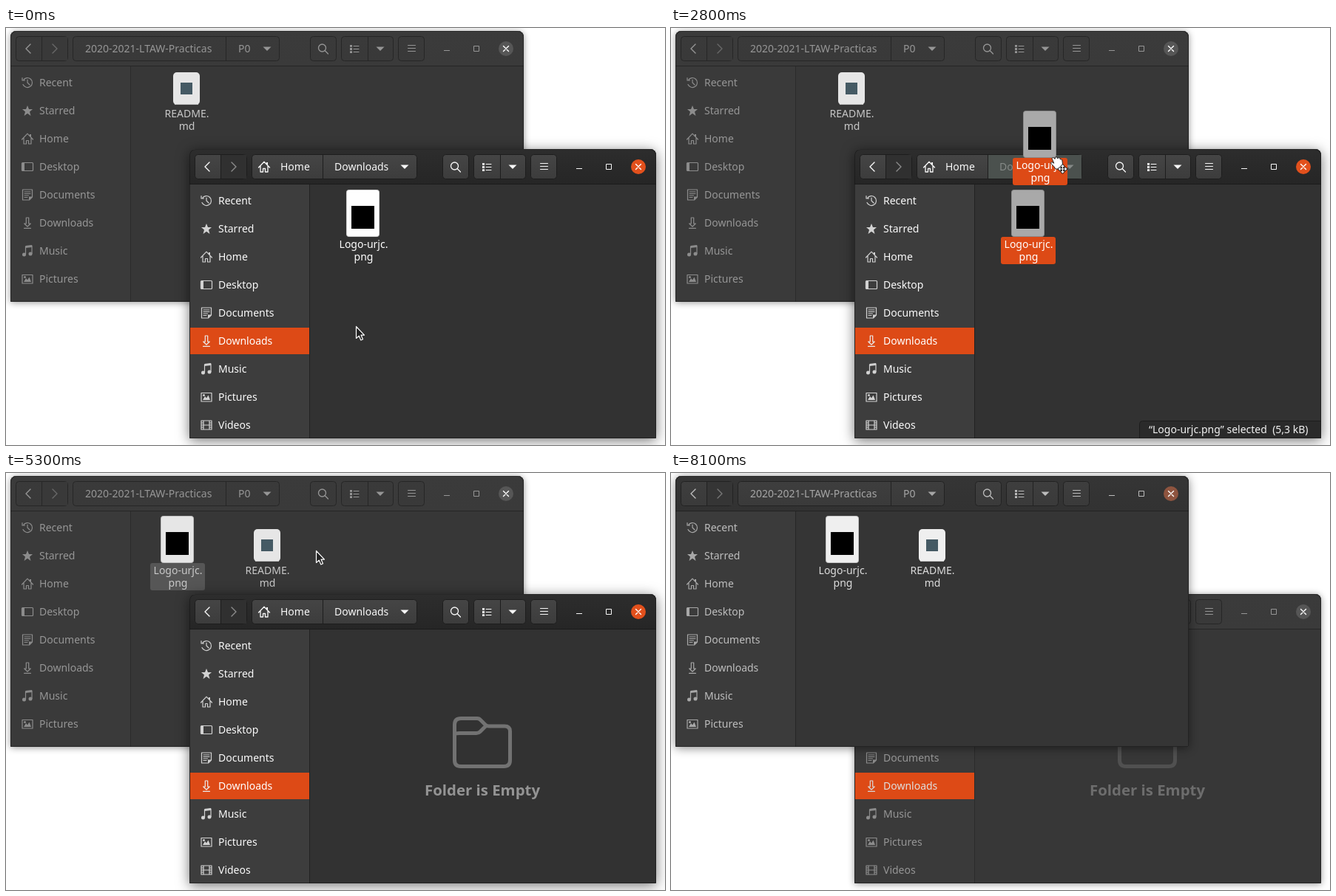
Animation, 891 px wide and 565 px high, one loop 8.2 s. Source, as an HTML page with a canvas:

```html
<!DOCTYPE html>
<html lang="en">
<head>
<meta charset="utf-8">
<title>Moving a file between folders</title>
<style>
  html, body { margin: 0; width: 100%; height: 100%; overflow: hidden; background: #fff; }
  canvas { display: block; width: 891px; height: 565px; }
</style>
</head>
<body>
<canvas id="stage" width="891" height="565"></canvas>
<script>
const ctx = document.getElementById('stage').getContext('2d');
const LOOP = 8200, STEP = 100;
const FONT = '14px "Noto Sans", "Open Sans", sans-serif';
const ORANGE = [221, 74, 22];

const lerp = (a, b, p) => a + (b - a) * p;
const rgb = c => `rgb(${c.map(Math.round).join(',')})`;
const grey = v => rgb([v, v, v]);
const mix = (a, b, p) => rgb(a.map((v, i) => lerp(v, b[i], p)));

// Piecewise linear track of [time, ...values]
function track(t, keys) {
  if (t <= keys[0][0]) return keys[0].slice(1);
  for (let i = 1; i < keys.length; i++) {
    const a = keys[i - 1], b = keys[i];
    if (t <= b[0]) {
      const p = (t - a[0]) / (b[0] - a[0]);
      return a.slice(1).map((v, k) => lerp(v, b[k + 1], p));
    }
  }
  return keys[keys.length - 1].slice(1);
}

function box(x, y, w, h, r, fill, stroke, lineWidth = 1) {
  ctx.beginPath();
  ctx.roundRect(x, y, w, h, r);
  if (fill) { ctx.fillStyle = fill; ctx.fill(); }
  if (stroke) { ctx.strokeStyle = stroke; ctx.lineWidth = lineWidth; ctx.stroke(); }
}

function rect(x, y, w, h, fill) {
  ctx.fillStyle = fill;
  ctx.fillRect(x, y, w, h);
}

function text(str, x, y, fill, align = 'left', font = FONT) {
  ctx.font = font;
  ctx.textAlign = align;
  ctx.fillStyle = fill;
  ctx.fillText(str, x, y);
}

function shape(x, y, stroke, line, fill, solid, width = 1.2) {
  ctx.save();
  ctx.translate(x, y);
  ctx.lineWidth = width;
  ctx.lineJoin = ctx.lineCap = 'round';
  if (solid) { ctx.fillStyle = fill; ctx.fill(new Path2D(solid)); }
  if (line) { ctx.strokeStyle = stroke; ctx.stroke(new Path2D(line)); }
  ctx.restore();
}

// [outline, solid part], centred on 0,0
const ICONS = {
  Recent: ['M-5.6-3.3A6.5 6.5 0 1 1-6 2.5M-7-6.5V-3H-3.5M0-4V0L3 3', ''],
  Starred: ['', 'M0-7L2-2H7L3 1.5 4.5 7 0 3.7-4.5 7-3 1.5-7-2H-2Z'],
  Home: ['M-7.5 1L0-6.8 7.5 1M-5-1V7H-1.5V2.5H1.5V7H5V-1', 'M3-6H5V-2L3-4Z'],
  Desktop: ['M-6.5-5.5H6.5Q7.5-5.5 7.5-4.5V4.5Q7.5 5.5 6.5 5.5H-6.5Q-7.5 5.5-7.5 4.5V-4.5Q-7.5-5.5-6.5-5.5Z', 'M-7-5H-4V5H-7Z'],
  Documents: ['M-6.5-7H6.5V3L2.5 7H-6.5ZM-4-4H4M-4-1.5H4M-4 1H1.5M-4 3.5H0', 'M6.5 2.5H2V7Z'],
  Downloads: ['M-1.7-7H1.7V1H4.3L0 5-4.3 1H-1.7ZM-4.5 7.3H4.5', ''],
  Music: ['M-2.5 4.5V-6L6-7V3.5', 'M-2.5-7L6-8V-5L-2.5-4ZM-2 5A2.5 2.5 0 1 1-7 5 2.5 2.5 0 1 1-2 5M6.5 4A2.5 2.5 0 1 1 1.5 4 2.5 2.5 0 1 1 6.5 4'],
  Pictures: ['M-7-5.5H7V6H-7Z', 'M-5 4L-2-1 0 1.5 2.5-2.5 5 4ZM-5-2.5A1.5 1.5 0 1 1-2-2.5 1.5 1.5 0 1 1-5-2.5'],
  Videos: ['M-7-6H7V6H-7ZM-4-6V6M4-6V6M-4 0H4M-7-3H-4M-7 0H-4M-7 3H-4M4-3H7M4 0H7M4 3H7', '']
};
const PLACES = Object.keys(ICONS);

const HEAD = {
  back: ['M3-6L-3 0 3 6', ''],
  next: ['M-3-6L3 0-3 6', ''],
  search: ['M4-1A5 5 0 1 1-6-1 5 5 0 1 1 4-1M2.8 2.8L7 7', ''],
  list: ['M-1-4H6M-1 0H6M-1 4H6', 'M-6-5.5H-3V-2.7H-6ZM-6-1.4H-3V1.4H-6ZM-6 2.7H-3V5.5H-6Z'],
  menu: ['M-5-4H5M-5 0H5M-5 4H5', ''],
  drop: ['', 'M-5.5-2.5H5.5L0 3Z']
};

function icon(def, x, y, color, width) {
  shape(x, y, color, def[0], color, def[1], width);
}

function buttons(y, focus, edges) {
  const x = edges[0], w = edges[edges.length - 1] - x;
  const fill = ctx.createLinearGradient(0, y, 0, y + 34);
  fill.addColorStop(0, grey(lerp(58, 69, focus)));
  fill.addColorStop(1, grey(lerp(57, 60, focus)));
  box(x + .5, y + .5, w - 1, 33, 4, fill, grey(lerp(38, 29, focus)));
  for (const e of edges.slice(1, -1)) rect(e, y + 1, 1, 32, grey(lerp(38, 29, focus)));
}

function logoCard(x, y, white, ink = 0) {
  box(x + .5, y + .5, 44, 63, 3, grey(white), grey(white * .82));
  rect(x + 7, y + 22, 31, 31, grey(ink));
}

function noteCard(x, y, white) {
  box(x, y, 36, 44, 5, grey(white));
  rect(x + 2, y + 43, 32, 1, grey(white * .82));
  rect(x + 10, y + 14, 16, 16, '#455a64');
}

function label(lines, cx, y, color) {
  lines.forEach((s, i) => text(s, cx, y + i * 17, color, 'center'));
}

function logoFile(x, y, white, color, plate, ink) {
  if (plate) box(x - 14, y + 64, 74, 37, 3, plate);
  logoCard(x, y, white, ink);
  label(['Logo-urjc.', 'png'], x + 23.5, y + 79, color);
}

function noteFile(x, y, white, color) {
  noteCard(x, y, white);
  label(['README.', 'md'], x + 18.5, y + 61, color);
}

function header(x, y, w, focus, path) {
  const cy = y + 24, right = x + w, top = y + 7;
  const bg = ctx.createLinearGradient(0, y, 0, y + 47);
  bg.addColorStop(0, grey(lerp(59, 45, focus)));
  bg.addColorStop(1, grey(lerp(58, 38, focus)));
  rect(x, y, w, 47, bg);
  rect(x, y, w, 1, grey(lerp(66, 62, focus)));
  rect(x, y + 47, w, 1, grey(lerp(38, 27, focus)));

  const ink = grey(lerp(150, 248, focus));
  const pathInk = grey(lerp(150, 248, focus * focus));
  buttons(top, focus, [x + 7, x + 42, x + 78]);
  rect(x + 43, top + 1, 34, 32, grey(lerp(57, 48, focus)));
  icon(HEAD.back, x + 24, cy, ink, 1.4);
  icon(HEAD.next, x + 60, cy, grey(lerp(105, 140, focus)), 1.4);

  const [split, end] = path.edges;
  buttons(top, focus, [x + 84, x + split, x + end]);
  if (path.target) rect(x + split + 1, top + 1, end - split - 2, 32, '#4b514e');
  const lastInk = path.target ? '#858a87' : pathInk;
  if (path.home) icon(ICONS.Home, x + 101, cy, pathInk, 1.3);
  text(path.names[0], x + path.at[0], cy + 5, pathInk);
  text(path.names[1], x + path.at[1], cy + 5, lastInk);
  icon(HEAD.drop, x + end - 17, cy, lastInk);

  buttons(top, focus, [right - 289, right - 253]);
  buttons(top, focus, [right - 247, right - 211, right - 176]);
  buttons(top, focus, [right - 170, right - 134]);
  icon(HEAD.search, right - 271.5, cy, ink, 1.3);
  icon(HEAD.list, right - 229, cy + .5, ink, 1);
  icon(HEAD.drop, right - 194, cy, ink);
  icon(HEAD.menu, right - 151.5, cy - .5, ink, 1);

  rect(right - 108, cy + 2, 8, 1, ink);
  box(right - 67.5, cy - 3.5, 7, 7, 0, null, ink);
  ctx.beginPath();
  ctx.arc(right - 24, cy, 10, 0, 7);
  ctx.fillStyle = mix([86, 86, 86], [226, 80, 28], focus);
  ctx.fill();
  shape(right - 24, cy, '#fff', 'M-3.5-3.5L3.5 3.5M3.5-3.5L-3.5 3.5', '', '', 1.4);
}

function sidebar(x, y, h, focus, active) {
  rect(x, y + 48, 162, h - 48, grey(lerp(58, 61, focus)));
  rect(x + 162, y + 48, 1, h - 48, grey(lerp(43, 34, focus)));
  PLACES.forEach((name, i) => {
    const cy = y + 70 + i * 38, on = name === active;
    if (on) rect(x + 1, cy - 18, 161, 36, rgb(ORANGE));
    icon(ICONS[name], x + 23, cy, grey(on ? lerp(215, 235, focus) : lerp(140, 210, focus)));
    text(name, x + 39, cy + 5, grey(on ? lerp(222, 255, focus) : lerp(150, 250, focus)));
  });
}

function folderWindow(x, y, w, h, focus, path, active, content) {
  const corners = [8, 8, 1, 1];
  ctx.save();
  ctx.shadowColor = `rgba(0,0,0,${lerp(.42, .55, focus)})`;
  ctx.shadowBlur = lerp(10, 17, focus);
  ctx.shadowOffsetY = lerp(1, 3, focus);
  box(x, y, w, h, corners, '#333');
  ctx.restore();

  ctx.save();
  ctx.beginPath();
  ctx.roundRect(x, y, w, h, corners);
  ctx.clip();
  rect(x, y, w, h, grey(lerp(55, 50, focus)));
  sidebar(x, y, h, focus, active);
  header(x, y, w, focus, path);
  content();
  box(x + .5, y + .5, w - 1, h - 1, corners, null, 'rgba(20,20,20,.55)');
  ctx.restore();
}

function emptyFolder(focus, alpha) {
  ctx.save();
  ctx.globalAlpha = alpha;
  const line = 'M2.5 24V11Q2.5 2.5 11 2.5H33Q36 2.5 38 5L44 11Q46 13 49 13H70Q77.5 13 77.5 20V59Q77.5 67.5 69 67.5H11Q2.5 67.5 2.5 59V24Q4 22.5 9 22.5H32Q35 22.5 37 20.5L44 13.5';
  shape(604, 330, grey(lerp(80, 114, focus)), line, '', '', 5);
  text('Folder is Empty', 644, 436.5, grey(lerp(109, 148, focus)), 'center',
    'bold 20.4px "Noto Sans", "Open Sans", sans-serif');
  ctx.restore();
}

function statusBar(alpha) {
  ctx.save();
  ctx.globalAlpha = alpha;
  box(633.5, 532.5, 250, 30, 4, '#2a2a2a', '#1c1c1c');
  text('“Logo-urjc.png” selected  (5,3 kB)', 646, 549, '#f2f2f2');
  ctx.restore();
}

function arrow(x, y) {
  shape(x + .5, y + .5, '#fff', 'M0 0V16L3.7 12.6 6.3 18.5 9 17.3 6.5 11.6H11Z',
    '#222', 'M0 0V16L3.7 12.6 6.3 18.5 9 17.3 6.5 11.6H11Z', 1.2);
}

function hand(x, y) {
  const palm = 'M3 5Q1 2 3.5 1.5Q5 1.5 6 3.5Q6 .5 8 .7Q9.5 1 9.8 3Q10.5 1 12 1.7Q13.3 2.3 13.2 4Q15 3 15.8 5L16.5 10Q16.5 13 15 17H7Q5 13 1.5 10.5Q-.5 8.5 1.5 7.8Q3 7.5 4.5 9Z';
  const cross = 'M16.5 12V22M11.5 17H21.5M15 13.5L16.5 12 18 13.5M15 20.5L16.5 22 18 20.5M13 15.5L11.5 17 13 18.5M20 15.5L21.5 17 20 18.5';
  shape(x, y, '#222', palm, '#fff', palm, 1);
  shape(x, y, '#111', cross, '', '', 3);
  shape(x, y, '#fff', cross, '', '', 1.2);
}

const CURSOR = [
  [200, 473, 404], [400, 490, 361], [600, 488, 294], [800, 474, 254], [1000, 474, 254],
  [1100, 474, 255], [2100, 474, 255], [2200, 470, 254], [3700, 470, 254],
  [3800, 340, 104], [5000, 340, 104], [5100, 358, 112], [5200, 393, 115], [5300, 419, 105],
  [6300, 419, 105], [6400, 418, 87], [6500, 418, 87], [6600, 412, 56], [6700, 411, 24]
];
const DRAG = [
  [2400, 460, 219], [2500, 468, 205], [2700, 504, 142], [2800, 476, 112], [3000, 370, 78],
  [3100, 335, 70], [3200, 335, 70], [3300, 333, 71], [3400, 331, 69], [3500, 331, 69], [3600, 329, 69]
];
const GRIP = [
  [2400, 465, 247], [2500, 467, 244], [2700, 508, 202], [2800, 513, 174], [3000, 400, 115],
  [3100, 340, 98], [3200, 340, 98], [3300, 338, 99], [3400, 336, 97], [3500, 336, 97], [3600, 334, 97]
];

function draw(t) {
  const [focus] = track(t, [[5700, 0], [5800, .3], [5900, .75], [6000, 1], [7900, 1], [8000, .72], [8100, .4]]);
  const other = t < 5800 ? 1 : t < 6000 ? 1 - focus : 0;
  const [picked] = track(t, [[1200, 0], [1300, .4], [1400, .8], [1500, 1]]);
  const [hover] = track(t, [[600, 0], [800, 1]]);
  const [empty] = track(t, [[3800, 0], [3900, .5], [4000, 1]]);
  const dragging = t >= 2500 && t < 3800, moved = t >= 3900;
  const [gx, gy] = track(t, GRIP);
  const overPath = dragging && gx > 423 && gx < 551 && gy > 165 && gy < 197;

  const projects = () => folderWindow(6, 4, 694, 367, focus, {
    names: ['2020-2021-LTAW-Practicas', 'P0'], at: [101, 308], edges: [291, 364]
  }, '', () => {
    const white = lerp(230, 252, focus), ink = grey(lerp(200, 252, focus));
    if (!moved) return noteFile(226, 60, white, ink);
    logoFile(209, 58, white, ink, t < 5900 && '#565656');
    noteFile(335, 76, white, ink);
  });

  const downloads = () => folderWindow(248, 164, 631, 392, other, {
    names: ['Home', 'Downloads'], at: [123, 196], edges: [180, 308], home: true, target: overPath
  }, 'Downloads', () => {
    if (t < 3800) {
      logoFile(460, 219, lerp(254, 169, picked), '#fff',
        picked && `rgba(${ORANGE},${picked})`, 18 * hover * (1 - picked));
      if (picked) statusBar(picked);
    }
    if (empty) emptyFolder(other, empty);
  });

  rect(0, 0, 891, 565, '#fff');
  const order = t < 5800 ? [projects, downloads] : [downloads, projects];
  order.forEach(paint => paint());

  if (dragging) {
    const [dx, dy] = track(t, DRAG);
    logoFile(Math.round(dx), Math.round(dy), 169, '#fff', rgb(ORANGE), 0);
    hand(Math.round(gx), Math.round(gy));
  } else if (t < 6800) {
    arrow(...track(t, CURSOR).map(Math.round));
  }
}

const start = performance.now();
function frame() {
  const t = (performance.now() - start) % LOOP;
  draw(Math.floor(t / STEP) * STEP);
  requestAnimationFrame(frame);
}
frame();
</script>
</body>
</html>
```
